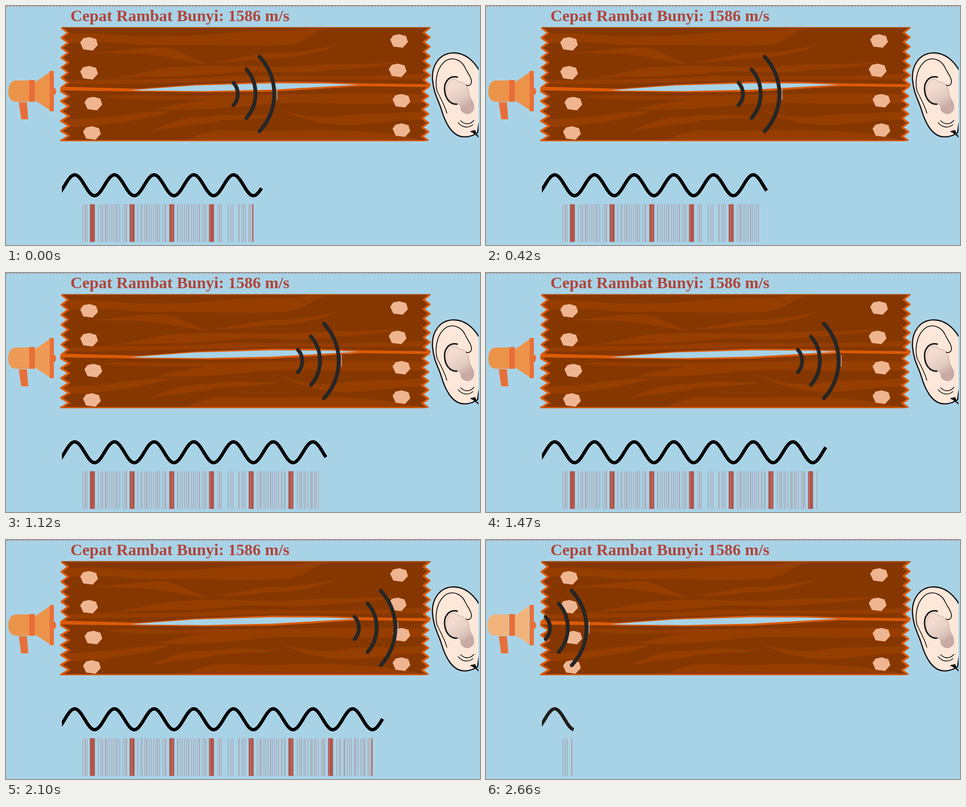
Write an HTML page that moves like this. It is 1000 by 504 pixels and loops after 2730 ms.

```html
<!DOCTYPE html>
<html lang="id">
<head>
<meta charset="utf-8">
<title>Cepat Rambat Bunyi</title>
<style>
html, body { margin: 0; width: 100%; height: 100%; overflow: hidden; background: #a8d3e7; }
svg { display: block; width: 100%; height: 100%; }
text { font: bold 34.5px "Liberation Serif", "Times New Roman", serif; fill: #b0453a; }
</style>
</head>
<body>
<svg viewBox="0 0 1000 504" fill="none">
  <defs>
    <linearGradient id="skin" x1=".2" y1="0" x2=".7" y2="1">
      <stop offset=".2" stop-color="#f3dccf"/><stop offset=".6" stop-color="#e2cac1"/><stop offset=".85" stop-color="#c9aaa5"/>
    </linearGradient>
    <clipPath id="planks"><path id="clipShape"/></clipPath>
    <clipPath id="earEdge"><path d="M890 90H997V280H890Z"/></clipPath>
    <clipPath id="reveal"><path d="M118 340H900V420H118Z"/></clipPath>
  </defs>
  <path d="M0 .5H1000" stroke="#bd898d" stroke-width="2" stroke-dasharray="4 3"/>
  <path d="M.5 0V504" stroke="#b3c7d5"/>
  <text x="136" y="32">Cepat Rambat Bunyi: 1586 m/s</text>

  <path id="wood" fill="#863700"/>
  <g clip-path="url(#planks)">
    <g fill="#963d00">
      <path d="M120 60C210 52 250 68 340 64C430 64 490 51 550 53C600 54 632 49 652 45H690C640 52 637 79 590 81C540 86 500 83 455 84C390 76 330 87 260 80C200 72 170 80 120 77Z"/>
      <path d="M180 99C240 96 285 87 335 87C365 92 395 112 428 123C375 116 330 104 285 101Z"/>
      <path d="M438 117C500 112 535 96 588 99C630 96 672 88 706 82C668 94 630 107 585 109C535 109 490 121 438 117Z"/>
      <path d="M210 153C290 145 320 128 385 128C480 122 550 133 625 126C700 121 755 126 832 117C790 130 730 131 670 137C590 145 540 133 470 141C390 151 300 147 210 153Z"/>
      <path d="M120 158C240 150 340 159 450 148C560 145 680 153 890 143V154C740 158 620 151 510 158C370 162 270 164 120 166Z"/>
      <path d="M205 190C280 184 350 194 440 188C520 190 600 183 890 186V204C720 211 620 199 540 207C460 216 390 221 315 218C350 211 380 202 425 198C340 195 270 201 205 190Z"/>
      <path d="M120 238C200 242 270 221 345 223C310 236 220 253 120 256Z"/>
      <path d="M302 264C345 248 368 232 425 235C480 224 530 233 578 231C520 242 475 235 430 246C385 252 345 257 302 264Z"/>
      <path d="M582 219C620 231 655 237 700 233C760 222 820 230 890 221V241C810 237 770 254 700 250C650 247 612 234 582 219Z"/>
      <path d="M378 285C405 270 430 260 475 262C570 267 650 257 735 264C800 267 840 274 890 285Z"/>
    </g>
    <path d="M115 170L280 174.5L400 165.5L560 159.5L660 160L750 163L897 165V171L750 169L640 176L560 180.5L430 182L290 180.5L115 178Z" fill="#dc5a08"/>
    <path d="M262 177.5L330 172.5L400 167.5L560 163L680 163.5L745 166L640 172L560 176.5L420 179.5L290 178.5Z" fill="#a8d3e7"/>
  </g>
  <path id="rim" stroke="#dc5a08" stroke-width="4" stroke-linejoin="round"/>
  <path d="M117 45.5H896" stroke="#b04c08" stroke-width="1.8"/>
  <path d="M114 284H885" stroke="#d85808" stroke-width="2.5"/>
  <g id="nails" fill="#efb591"></g>

  <g id="horn">
    <path id="body" d="M50 157H22C9 157 5 169 5 181C5 195 11 202 23 202H50ZM61 161L93 139V220L61 199Z"/>
    <path d="M49 156H61V202H49ZM92 137H101V222H92ZM27 203H44L47 239H32Z" fill="#e96f38"/>
    <path d="M101 173H104L106 180L104 187H101Z" fill="#e96f38"/>
  </g>

  <g clip-path="url(#earEdge)" stroke="#141214" stroke-linecap="round">
    <path d="M1003 144C988 114 966 97 941 99C914 101 897 126 900 157C903 187 913 199 919 220C927 247 942 276 967 276C980 276 987 272 995 267L1003 210Z" fill="#fde7d8" stroke-width="2.6"/>
    <path d="M955 160C967 160 976 169 977 184C977 194 988 202 987 215C985 229 970 230 963 223C956 217 964 208 952 207C934 203 925 190 929 174C934 153 944 149 955 160Z" fill="url(#skin)" stroke="#a98f90" stroke-width=".8"/>
    <path d="M909 178C904 154 911 125 930 114C945 107 962 115 969 131C974 142 983 151 982 162C980 167 976 169 971 167" stroke-width="1.8"/>
    <path d="M952 150C933 146 922 163 926 183C929 199 940 208 951 207" stroke-width="3"/>
    <path d="M909 178C917 196 925 208 930 226M954 246C963 257 976 258 985 250M959 242C969 252 981 249 987 241" stroke-width="1.6"/>
    <path d="M981 265L989 263L993 272L998 277" stroke-width="2.5" fill="#141214"/>
  </g>

  <g id="arcs" stroke="#262626" stroke-width="8" stroke-linecap="round">
    <path d="M480 162A35 35 0 0 1 480 209M507.5 134A78 78 0 0 1 507.5 236M535 107A114.9 114.9 0 0 1 535 264"/>
    <path d="M571.5 173V197" stroke="#b9b6c6" stroke-width="1.5"/>
  </g>
  <path id="wave" clip-path="url(#reveal)" stroke-width="7" stroke-linejoin="round"/>
  <g id="bars"></g>
</svg>
<script>
const $ = id => document.getElementById(id);
const LOOP = 2730, STEP = 70, RESET = 2520, PERIOD = 83.75;

// Zigzag points between an outer and an inner x
function teeth(outer, inner, top, bottom, count) {
  const pts = [];
  for (let i = 0; i <= count * 2; i++)
    pts.push([i % 2 ? inner : outer, top + (bottom - top) * i / (count * 2)]);
  return pts;
}
const left = [...teeth(117, 131, 46, 172, 6), ...teeth(116, 133, 180, 284, 5)];
const right = [...teeth(894, 881, 46, 166, 6), ...teeth(891, 878, 171, 284, 6)];
const shape = `M${left.join('L')}L${right.reverse().join('L')}Z`;
$('wood').setAttribute('d', shape);
$('clipShape').setAttribute('d', shape);
$('rim').setAttribute('d', `M${left.join('L')}M${right.join('L')}`);

$('nails').innerHTML = [[175, 80], [175, 141], [184, 206], [181, 268], [829, 74], [826, 136], [834, 200], [834, 262]]
  .map(p => `<path transform="translate(${p})" d="M-18.5-3L-12-12L1-14.5L15-10.5L19 2L8 14L-12 11.5Z"/>`).join('');

// Thin lines of the compression pattern, slightly irregular from one period to the next
let seed = 7;
const random = () => (seed = seed * 16807 % 2147483647) / 2147483647;
const gaps = [18, 23, 27, 33, 36, 41, 46, 50, 55, 59, 63, 70, 74, 77];
const lines = [162, 167, 171];
for (let k = 0; k < 8; k++)
  for (const gap of gaps)
    if (k != 3 || random() > .3) lines.push(177 + k * PERIOD + gap + (k ? random() * 2 - 1 : 0));

const stops = [[0, 539], [420, 592], [700, 624], [1120, 675], [1820, 759], [2380, 830]];
function headAt(t) {
  if (t >= RESET) return 185 + (t - 2660) * .1223;
  let i = 0;
  while (i < stops.length - 2 && t > stops[i + 1][0]) i++;
  const [t0, x0] = stops[i], [t1, x1] = stops[i + 1];
  return x0 + (x1 - x0) * (t - t0) / (t1 - t0);
}

const bar = (x, w, color) => `<rect x="${x.toFixed(1)}" y="418" width="${w}" height="79.5" fill="${color}"/>`;

function drawBars(head) {
  const fresh = head < 200, limit = Math.min(797, Math.max(182, head - 16));
  let out = '';
  lines.forEach((x, i) => {
    if (x <= limit) out += bar(x - .7, 1.5, fresh ? '#a4a1aa' : i % 5 == 1 ? '#b58a8c' : '#aea3af');
  });
  for (let k = 0; k < 8; k++) {
    const x = 177 + k * PERIOD;
    if (x + 33 < head) {
      out += bar(x, 10.5, '#b2554b');
      if (k) out += bar(x + 2 + k % 3 * 2, 1, '#bd8580');
    } else if (x < limit) {
      for (const d of [0, 3.5, 7]) if (!fresh && x + d < limit) out += bar(x + d, 1.3, '#b99291');
      out += bar(Math.min(limit, x + 10) - 2, 2, fresh ? '#b4969f' : '#b2554b');
    }
  }
  $('bars').innerHTML = out;
}

function drawWave(head) {
  const pts = [];
  for (let x = 112; x < head; x += 2) pts.push(x);
  pts.push(head);
  $('wave').setAttribute('d', 'M' + pts.map(x =>
    `${x} ${(378 - 22 * Math.cos((x - 145) / PERIOD * 2 * Math.PI)).toFixed(2)}`).join('L'));
  $('wave').setAttribute('stroke', head < 200 ? '#211d1a' : '#000');
}

function drawHorn(t) {
  const glow = Math.max(0, Math.min(1, (140 - Math.abs(t % 500 - 250)) / 40));
  const mix = (a, b) => Math.round(a + (b - a) * glow);
  $('body').setAttribute('fill', `rgb(${mix(236, 240)},${mix(147, 180)},${mix(74, 123)})`);
  $('body').setAttribute('transform', `translate(${-2 * glow} 0)`);
}

function frame(now) {
  const t = Math.floor(now % LOOP / STEP) * STEP;
  const head = headAt(t);
  $('arcs').setAttribute('transform', `translate(${head - 539} 0)`);
  drawWave(head);
  drawBars(head);
  drawHorn(t);
}

let start;
function tick(now) {
  start ??= now;
  frame(now - start);
  requestAnimationFrame(tick);
}
frame(0);
requestAnimationFrame(tick);
</script>
</body>
</html>
```
